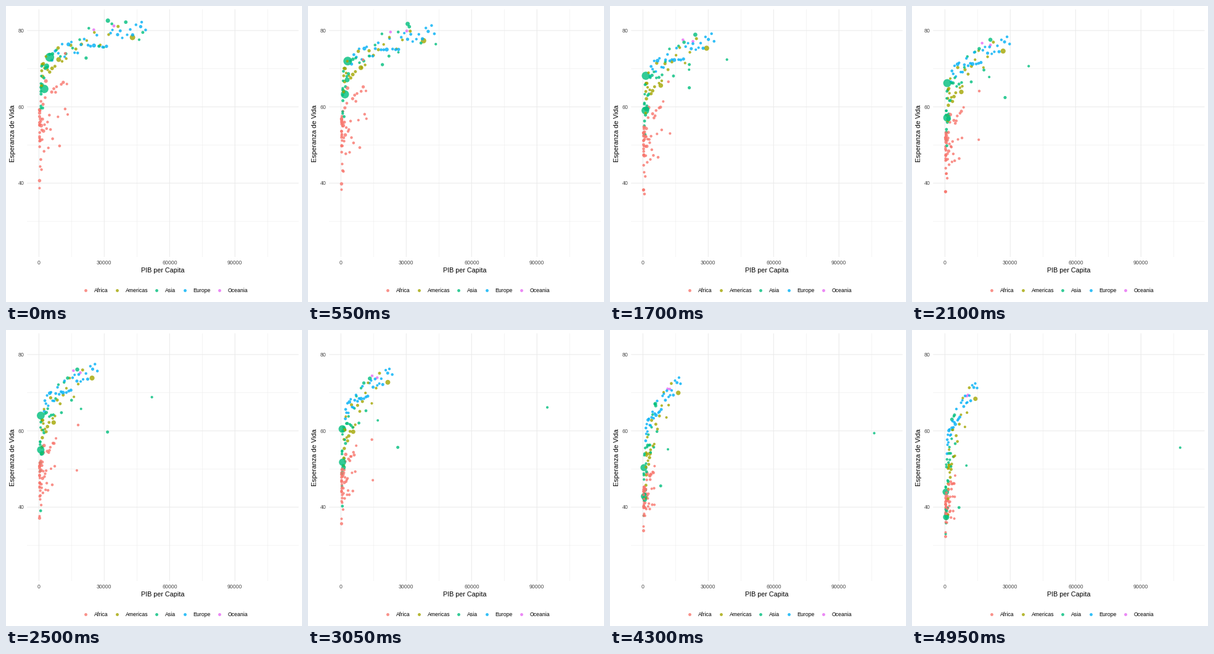
These frames come from a looping animation (480 by 480 pixels, 5000 ms). A matplotlib script:

```python
import numpy as np
import matplotlib.pyplot as plt
from matplotlib.animation import FuncAnimation

SIZE, DPI = 480, 96
PT = 72 / DPI                      # points per pixel
FRAMES, INTERVAL = 100, 50
KEYS = 12                          # one pose every five years, 1952 to 2007
STEP = (FRAMES - 1) / (KEYS - 1)
ALPHA = 0.8

COLORS = {"Africa": "#F8766D", "Americas": "#A3A500", "Asia": "#00BF7D",
          "Europe": "#00B0F6", "Oceania": "#E76BF3"}

# Per continent: count, then for the first and last year
# (lowest GDP, highest GDP, skew, life of poorest, life of richest, spread).
CROWDS = {
    "Africa": (49, (300, 4700, 2.7, 36, 44, 4), (280, 13000, 3.6, 46, 62, 7)),
    "Americas": (23, (1400, 11300, 2.5, 43, 67, 4), (1200, 36000, 2.5, 67, 79.5, 2)),
    "Asia": (25, (330, 4800, 2, 38, 60, 6), (900, 47000, 4, 61, 81, 2.5)),
    "Europe": (30, (1000, 14700, 1.6, 56, 72, 1.6), (6000, 49000, 1, 74, 81, 1.5)),
    "Oceania": (2, (10040, 10557, 1, 69.1, 69.4, 0), (25185, 34435, 1, 80.2, 81.2, 0)),
}

rng = np.random.default_rng(7)
t = np.linspace(0, 1, KEYS)
year = 1952 + 55 * t
ease = 1 - (1 - t) ** 1.35         # gains come faster early on
dots = []


def mix(a, b, s=t):
    return a + (b - a) * s


def geo(a, b):
    """Steady percentage growth from a to b."""
    return a * (b / a) ** t


def curve(start, middle, end):
    """Parabola through three values."""
    return (2 * (t - 0.5) * (t - 1) * start + 4 * t * (1 - t) * middle
            + 2 * t * (t - 0.5) * end)


def bump(center, width):
    return np.exp(-((year - center) / width) ** 2)


def add(continent, pop, gdp, life):
    dots.append((COLORS[continent], gdp, life, mix(0.42 * pop, pop)))


def add_giant(continent, pop, gdp, life):
    add(continent, pop, np.exp(curve(*np.log(gdp))), curve(*life))


def add_oil(continent, pop, gdp, boom, life):
    add(continent, pop, geo(*gdp) * (1 + boom * bump(1977, 9.3)),
        mix(*life, ease))


def add_crowd(continent, count, first, last):
    low, high = geo(first[0], last[0]), geo(first[1], last[1])
    skew, rich, spread = (mix(first[k], last[k]) for k in (2, 4, 5))
    poor = mix(first[3], last[3], ease)
    for rank in np.linspace(0, 1, count):
        pop = min(8 * np.exp(rng.normal(0, 1.1)), 110)
        z = rng.uniform(-1.3, 1.3) + rng.uniform(-0.5, 0.5) * t
        wobble = spread * rng.normal(0, 0.08, KEYS)
        gdp = low + (high - low) * rank ** skew
        life = mix(poor, rich, rank) + spread * z + wobble
        add(continent, pop, gdp * np.exp(0.15 * wobble / (spread + 1)),
            np.minimum(life, 82.2))


add_giant("Asia", 1319, (400, 850, 4959), (44, 64.2, 73))
add_giant("Asia", 1110, (547, 835, 2452), (37.4, 55.2, 64.7))
add_giant("Asia", 224, (750, 1440, 3541), (37.5, 54.3, 70.7))
add_giant("Asia", 127, (3217, 17800, 31656), (63, 76.2, 82.6))
add_giant("Americas", 301, (13990, 24500, 42952), (68.4, 73.9, 78.2))
add_giant("Americas", 190, (2109, 6830, 9066), (50.9, 62.3, 72.4))

add_oil("Asia", 28, (6460, 21655), 1.9, (39.9, 72.8))
add_oil("Asia", 0.7, (9867, 29796), 0.15, (50.9, 75.6))
add_oil("Africa", 6, (2388, 12057), 2.7, (42.7, 74))
add_oil("Africa", 1.5, (4293, 13206), 1.5, (37, 58))

# A very rich start that collapses in the mid seventies.
collapse = 84000 / (1 + np.exp((year - 1975.8) / 1.8))
add("Asia", 2.5, mix(24000, 46000) + collapse - 28000 * bump(1966, 4),
    mix(55.6, 77.6, ease))

# Two sudden drops in life expectancy.
add("Asia", 14, geo(368, 1714), mix(39.4, 59.7) - 17.5 * bump(1976.5, 3.7))
add("Africa", 8.9, geo(493, 863), mix(40, 46.2) - 21.5 * bump(1993, 4.3))

for continent, crowd in CROWDS.items():
    add_crowd(continent, *crowd)

order = rng.permutation(len(dots))
colors = [dots[i][0] for i in order]
gdps, lives, pops = (np.array([dots[i][k] for i in order]) for k in (1, 2, 3))


def px(gdp):
    return 53.4 + gdp * 0.003532


def py(life):
    return 39.8 + (80 - life) * 6.187


def area(size):
    """Marker area in square points for a point size in millimetres."""
    radius = 0.375 * (2.845 * size + 0.94) + 0.47
    return (2 * radius * PT) ** 2


def pose(i):
    key = KEYS - 1 - i / STEP
    k = min(int(key), KEYS - 2)
    gdp, life, pop = (mix(a[:, k], a[:, k + 1], key - k)
                      for a in (gdps, lives, pops))
    sizes = area(1 + 5 * np.sqrt(pop / 1319))
    return np.column_stack([px(gdp), py(life)]), sizes


fig = plt.figure(figsize=(SIZE / DPI, SIZE / DPI), dpi=DPI, facecolor="white")
ax = fig.add_axes([0, 0, 1, 1])
ax.set_xlim(0, SIZE)
ax.set_ylim(SIZE, 0)
ax.axis("off")

LEFT, RIGHT, TOP, BOTTOM = 34.2, 474.5, 5.5, 407


def grid(xs, ys, width):
    style = dict(color="#EBEBEB", lw=width * PT, snap=False,
                 solid_capstyle="butt", zorder=1)
    for x in xs:
        ax.plot([px(x)] * 2, [TOP, BOTTOM], **style)
    for y in ys:
        ax.plot([LEFT, RIGHT], [py(y)] * 2, **style)


def label(x, y, text, size=8.8, color="black", ha="center", rotation=0):
    ax.text(x, y, text, fontsize=size * PT, color=color, ha=ha, va="baseline",
            rotation=rotation, rotation_mode="anchor", family="Liberation Sans")


grid(range(15000, 110000, 30000), (30, 50, 70), 0.53)
grid(range(0, 100000, 30000), (40, 60, 80), 1.07)

for x in range(0, 100000, 30000):
    label(px(x), 418.7, str(x), color="#4D4D4D")
for y in (40, 60, 80):
    label(29.2, py(y) + 3.2, str(y), color="#4D4D4D", ha="right")
label(254.3, 432, "PIB per Capita", 10.8)
label(13.8, 206.2, "Esperanza de Vida", 11, rotation=90)

for (name, color), x in zip(COLORS.items(), (129.4, 179.9, 243.9, 289.6, 346.4)):
    ax.scatter(x, 460.5, s=area(1.5), c=color, alpha=ALPHA, linewidths=0)
    label(x + 13.6, 463.8, name, ha="left")

offsets, sizes = pose(0)
cloud = ax.scatter(offsets[:, 0], offsets[:, 1], s=sizes, c=colors,
                   alpha=ALPHA, linewidths=0, zorder=3)


def update(i):
    offsets, sizes = pose(i)
    cloud.set_offsets(offsets)
    cloud.set_sizes(sizes)
    return (cloud,)


anim = FuncAnimation(fig, update, frames=FRAMES, interval=INTERVAL,
                     repeat=True, repeat_delay=0, blit=False)
plt.show()
```
